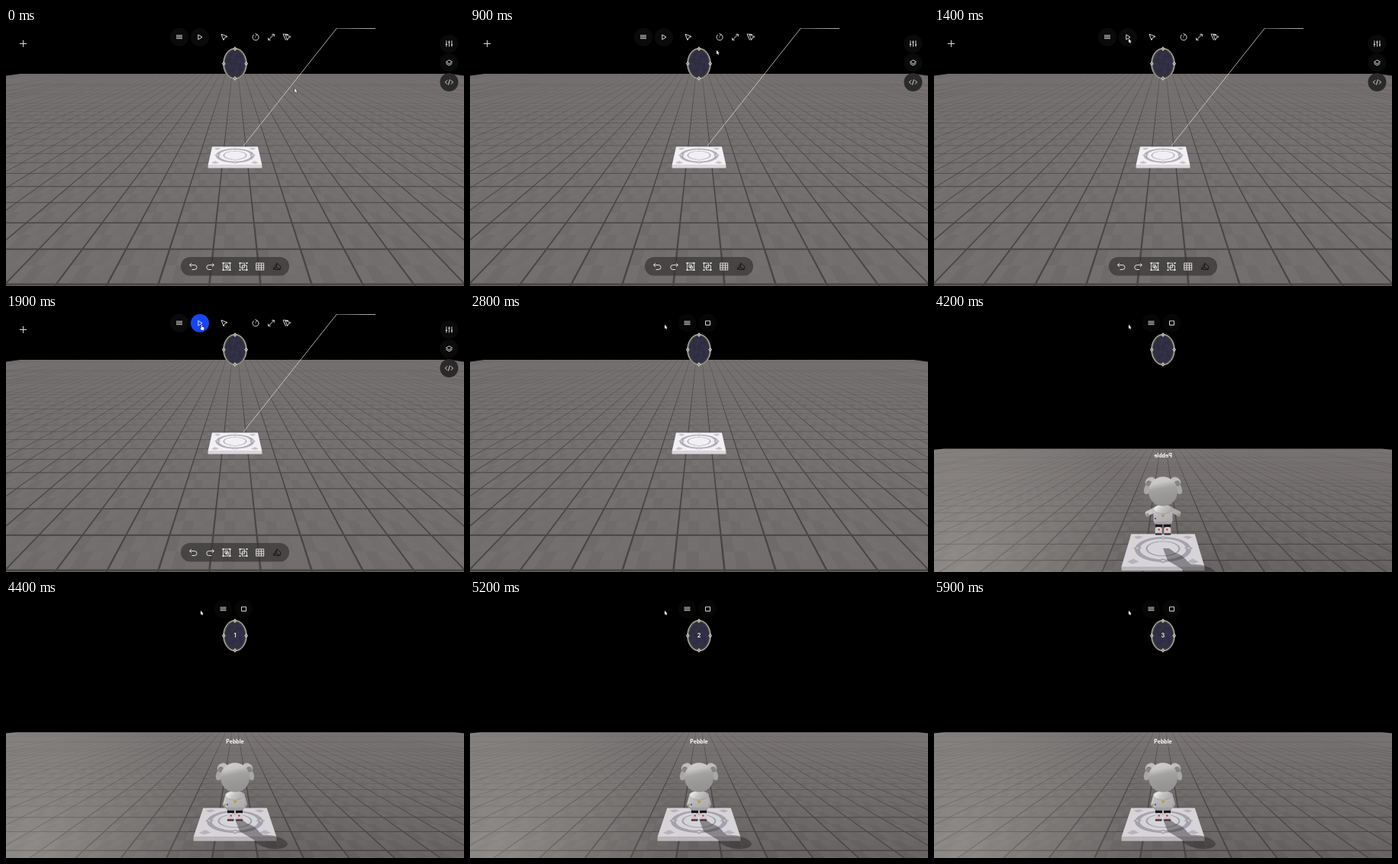
Write an HTML page with a canvas that moves like this. It is 600x338 px and loops after 6 s.

```html
<!DOCTYPE html>
<html lang="en">
<head>
<meta charset="utf-8">
<title>Scene editor</title>
<style>
  html, body { margin: 0; width: 100%; height: 100%; overflow: hidden; background: #000; }
  canvas { display: block; width: 100vw; height: 100vh; }
</style>
</head>
<body>
<canvas id="stage" width="600" height="338"></canvas>
<script>
const W = 600, H = 338, LOOP = 6000, FOCAL = 357, EDGE = 35.5, FAR = 36.5;
const canvas = document.getElementById('stage');
let ctx = canvas.getContext('2d');

const clamp = v => Math.max(0, Math.min(1, v));
const mix = (a, b, k) => a + (b - a) * k;

// Cameras: horizon in px, height in tiles, depth of the pad, cosine of the pitch.
const editorCam = { horizon: 23, height: 4.32, depth: 11.34, cos: .925, near: -8.5, glow: 0,
  floor: ['#757171', '#716d6c'], pad: '#f2f0f4', side: '#d9d7dc', mark: '#b1afb6' };
const playCam = height => ({ horizon: 147.5, height, depth: 7.79, cos: .998, near: -4.5, glow: .32,
  floor: ['#787473', '#666261'], pad: '#d6d4d9', side: '#b9b7bc', mark: '#a5a3aa' });

function project(cam, x, z, lift = 0) {
  const d = cam.depth + z * cam.cos;
  return [W / 2 + FOCAL * x / d, cam.horizon + FOCAL * (cam.height - lift) / (cam.cos * d)];
}

function gradient(x0, y0, x1, y1, ...colors) {
  const g = ctx.createLinearGradient(x0, y0, x1, y1);
  colors.forEach((c, i) => g.addColorStop(i / (colors.length - 1), c));
  return g;
}

function trace(points) {
  points.forEach(([x, y], i) => i ? ctx.lineTo(x, y) : ctx.moveTo(x, y));
  ctx.closePath();
}

function poly(points, color) {
  ctx.fillStyle = color;
  ctx.beginPath();
  trace(points);
  ctx.fill();
}

const quad = (cam, x0, z0, x1, z1, color, lift) =>
  poly([[x0, z0], [x1, z0], [x1, z1], [x0, z1]].map(([x, z]) => project(cam, x, z, lift)), color);

function ellipse(x, y, rx, ry, fill, stroke, width = 1, turn = 0) {
  ctx.beginPath();
  ctx.ellipse(x, y, rx, ry, turn, 0, 7);
  if (fill) { ctx.fillStyle = fill; ctx.fill(); }
  if (stroke) { ctx.strokeStyle = stroke; ctx.lineWidth = width; ctx.stroke(); }
}

function box(x, y, w, h, r, fill) {
  ctx.fillStyle = fill;
  ctx.beginPath();
  ctx.roundRect(x, y, w, h, r);
  ctx.fill();
}

function drawFloor(cam) {
  const top = project(cam, 0, FAR)[1];
  const ground = color => quad(cam, -EDGE, cam.near, EDGE, FAR, color);
  ground(gradient(0, top, 0, H, ...cam.floor));

  // Mottled texture, the same on every tile.
  for (let z = cam.near; z < 8; z++) {
    for (let x = -20.5; x < 20; x++) {
      for (let i = 0; i < 16; i++) {
        const tone = Math.abs(Math.sin(i * 91.7 + 3) * 437.5) % 1;
        if (tone > .3 && tone < .7) continue;
        const px = x + (i % 4) / 4, pz = z + (i >> 2) / 4;
        quad(cam, px, pz, px + .25, pz + .25, tone < .5 ? 'rgba(30,24,24,.035)' : 'rgba(255,245,245,.02)');
      }
    }
  }
  for (let x = -EDGE; x <= EDGE; x++) quad(cam, x - .02, cam.near, x + .02, FAR, '#484544');
  for (let z = cam.near; z <= FAR; z++) {
    const strength = mix(1, .4, clamp((z - 1) / 14));
    quad(cam, -EDGE, z - .025, EDGE, z + .025, `rgba(72,69,68,${strength})`);
  }
  // Light falling in from the lower left.
  const light = ctx.createRadialGradient(30, H, 0, 30, H, 250);
  light.addColorStop(0, `rgba(225,222,218,${cam.glow})`);
  light.addColorStop(1, 'rgba(225,222,218,0)');
  ground(light);
}

function drawPad(cam) {
  const s = 1.03, lift = .1;
  const at = (x, z) => project(cam, x, z, lift);
  const circle = r => Array.from({ length: 48 }, (_, i) =>
    at(r * Math.cos(i * Math.PI / 24), r * Math.sin(i * Math.PI / 24)));
  const ring = (outer, inner, color) => {
    ctx.fillStyle = color;
    ctx.beginPath();
    trace(circle(outer));
    trace(circle(inner));
    ctx.fill('evenodd');
  };
  const diamond = (x, z, r, color) => poly([at(x - r, z), at(x, z + r), at(x + r, z), at(x, z - r)], color);

  poly([at(-s, -s), at(s, -s), project(cam, s, -s), project(cam, -s, -s)], cam.side);
  quad(cam, -s, -s, s, s, cam.pad, lift);
  ring(.8, .66, cam.mark);
  ring(.49, .44, cam.mark);
  for (const [x, z] of [[1, 0], [-1, 0], [0, 1], [0, -1]]) {
    diamond(x * .73, z * .73, .13, cam.mark);
    diamond(x * .73, z * .73, .05, cam.pad);
  }
  for (const x of [-1, 1]) for (const z of [-1, 1]) {
    poly([[.62, .78], [.78, .9], [.92, .78], [.78, .62]].map(([a, b]) => at(x * a, z * b)), cam.mark + 'b0');
  }
}

const sceneCache = new Map();
function drawScene(cam) {
  const key = cam.horizon + ':' + cam.height;
  if (!sceneCache.has(key)) {
    const layer = document.createElement('canvas');
    layer.width = W;
    layer.height = H;
    const main = ctx;
    ctx = layer.getContext('2d');
    drawFloor(cam);
    drawPad(cam);
    ctx = main;
    sceneCache.set(key, layer);
  }
  ctx.drawImage(sceneCache.get(key), 0, 0);
}

function label(text, x, y, size, weight = 700) {
  ctx.font = `${weight} ${size}px Inter, "Open Sans", sans-serif`;
  ctx.textAlign = 'center';
  ctx.textBaseline = 'middle';
  ctx.fillStyle = '#fff';
  ctx.fillText(text, x, y);
}

function drawPortal(count) {
  ellipse(300, 46.7, 14.5, 19.4, '#302f43', '#5d5b53', 2.6);
  for (let i = 0; i < 22; i++) {
    const a = i * 2.4, r = Math.sqrt(i / 22);
    ellipse(300 + 11 * r * Math.cos(a), 46.7 + 15 * r * Math.sin(a), 1.6, 1.6, i % 2 ? '#3b3a5070' : '#26263670');
  }
  ellipse(300, 46.7, 15, 19.9, null, '#c3bfa9', 1);
  for (const [x, y] of [[300, 27.3], [300, 66], [285.3, 46.7], [314.7, 46.7]]) {
    poly([[x - 2.4, y], [x, y - 3], [x + 2.4, y], [x, y + 3]], '#cbc8ba');
    ellipse(x, y, .9, .9, '#77746a');
  }
  if (count) label(count, 300, 47, 7.5, 600);
}

const icons = {
  plus: 'M-4.5 0H4.5M0-4.5V4.5',
  menu: 'M-4-2H4M-4 0H4M-4 2H4',
  play: 'M-2.2-3.2L3 0L-2.2 3.2Z',
  stop: 'M-3-2.5H3V3H-3Z',
  pointer: 'M-4-4L4-.8L.6 .6L-.9 4Z',
  rotate: 'M-2.2-3.2A4 4 0 1 0 2-3.4M2-3.4L-.6-4.8M2-3.4L0-1.4M-.5 0H.5',
  scale: 'M-3.8 3.8L3.8-3.8M.8-3.8H3.8V-.8M-3.8 .8V3.8H-.8',
  multi: 'M-2-3.5L5-.5L2 .8L.5 4ZM-5-4L-1.5 4M-5-4L2-3.5',
  sliders: 'M-3.5-4V4M0-4V4M3.5-4V4M-4.7 1H-2.3M-1.2-2H1.2M2.3 1.5H4.7',
  layers: 'M0-3.5L4-1L0 1.4L-4-1ZM-4 1L0 3.5L4 1',
  code: 'M-2.5-2.6L-5 0L-2.5 2.6M2.5-2.6L5 0L2.5 2.6M1-3.5L-1 3.5',
  undo: 'M-2.5-4.5L-5-2L-2.5 .5M-5-2H1.5A3 3 0 0 1 1.5 4H-2',
  redo: 'M2.5-4.5L5-2L2.5 .5M5-2H-1.5A3 3 0 0 0-1.5 4H2',
  group: 'M-4.5-4.5H4.5V4.5H-4.5ZM-2.2-2.2H1V1H-2.2ZM-.5-.5H2.5V2.5H-.5Z',
  ungroup: 'M-4.5-4.5H1.5V1.5H-4.5ZM-1.5-1.5H4.5V4.5H-1.5Z',
  grid: 'M-5-4.5H5V4.5H-5ZM-1.7-4.5V4.5M1.7-4.5V4.5M-5-1.5H5M-5 1.5H5',
  snap: 'M-5 3.5L0-4.5L5 0L4 4ZM0-4.5L-1 1L-5 3.5M-1 1L4 4'
};

function icon(name, x, y, color = '#e4e4e4') {
  ctx.save();
  ctx.translate(x, y);
  ctx.strokeStyle = color;
  ctx.lineWidth = .95;
  ctx.stroke(new Path2D(icons[name]));
  ctx.restore();
}

function button(name, x, y, fill) {
  ellipse(x, y, 12, 12, fill);
  icon(name, x, y);
}

function drawEditor(hover) {
  ctx.strokeStyle = '#d8d8d0';
  ctx.lineWidth = .8;
  ctx.stroke(new Path2D('M311 154.5L433.5 0L484 .6'));
  icon('plus', 22.5, 20.5);
  button('menu', 227, 11.7, '#0a0a0a');
  ellipse(254, 12, 12, 12, '#0a0a0a');
  ellipse(254, 12, 12, 12, `rgba(22,70,240,${hover})`);
  icon('play', 254, 12);
  [['pointer', 286], ['rotate', 327], ['scale', 347.5], ['multi', 368]].forEach(([n, x]) => icon(n, x, 12));
  button('sliders', 580.5, 20.5, '#0a0a0a');
  button('layers', 580.5, 45.5, '#0a0a0a');
  button('code', 580.5, 71, '#2b2929');
  box(229, 300, 142, 24.5, 12, 'rgba(56,53,53,.72)');
  ['undo', 'redo', 'group', 'ungroup', 'grid'].forEach((n, i) => icon(n, 245.5 + i * 21.8, 312.5));
  for (const x of [289, 311]) for (const dx of [-4.5, 4.5]) for (const dy of [-4.5, 4.5])
    box(x + dx - 1, 312.5 + dy - 1, 2, 2, 0, '#e4e4e4');
  icon('snap', 355, 312.5, '#161616');
}

function drawShadow(drop) {
  ctx.save();
  ctx.translate(0, drop);
  ctx.fillStyle = 'rgba(30,28,30,.42)';
  ctx.beginPath();
  ctx.ellipse(347, 317, 22, 8.5, .15, 0, 7);
  ctx.ellipse(319, 301, 15, 6.5, .5, 0, 7);
  trace([[300, 287], [308, 287], [340, 310], [328, 316], [306, 303]]);
  ctx.fill();
  ctx.restore();
}

function drawCharacter(spread, sway) {
  for (const side of [-1, 1]) {
    const at = x => 300 + side * x;
    box(at(5.5) - 4.5, 273, 9, 7, 2, '#17161a');
    box(at(5.8) - 4.5, 279, 9, 10.5, 3, '#d2cfd0');
    box(at(5.8) - 4.5, 287.3, 9, 2.2, 1, '#2f2c2e');
    ellipse(at(5.3), 282.5, 1.3, 1.3, '#d2374a');
    box(at(5.8) - 3.5, 285.5, 7, 1, 0, '#d9a2a9');
    const handX = mix(12.5, 20, spread), handY = mix(267.5, 261.5, spread) + sway;
    ctx.lineCap = 'round';
    ctx.lineWidth = 6.5;
    ctx.strokeStyle = side < 0 ? '#c9c7c6' : '#adabac';
    ctx.beginPath();
    ctx.moveTo(at(9.5), 256);
    ctx.lineTo(at(handX), handY);
    ctx.stroke();
    ctx.lineCap = 'butt';
    ellipse(at(handX + .5), handY + 2, 2.2, 2.5, '#98969a');
  }
  box(287.5, 250 + sway, 25, 25.5, [10, 10, 5, 5], gradient(292, 250, 304, 276, '#d6d4d3', '#b7b5b8', '#acaaae'));
  box(288.5, 271.5, 23, 4, 2, '#a3a1a4');
  ellipse(300, 256 + sway, 12.5, 6, gradient(292, 251, 304, 262, '#eeecec', '#c5c3c4', '#b0aeb0'), '#989698', .6);
  poly([[297.8, 262], [300, 263.2], [302.2, 262], [301.2, 266], [298.8, 266]], '#b99a3a');
  ellipse(290, 268, 1, 1, '#48464a');

  for (const side of [-1, 1]) {
    const at = x => 300 + side * x;
    ellipse(at(20.5), 229, 4.2, 7.5, '#a9a7a5', '#8b898860', .5, side * -.3);
    ellipse(at(16.5), 219.5, 7, 5.7, '#bfbdbb', '#8f8d8c', .5, side * .5);
    ellipse(at(18.5), 222, 3.6, 3.8, '#858382');
  }
  ellipse(300, 232.5, 19, 19.3,
    gradient(295, 213, 303, 252, '#d0cecc', '#c8c6c4', '#a3a2a1', '#9b9a99', '#969594', '#929190'));
}

function drawName(mirrored) {
  ctx.save();
  ctx.translate(300, 186.3);
  if (mirrored) ctx.scale(-1, 1);
  label('Pebble', 0, 0, 7);
  ctx.restore();
}

const cursorPath = [[300, 378, 79], [500, 371, 68], [700, 351, 46], [900, 323, 29],
  [1000, 293, 20], [1100, 276, 17], [1250, 261, 15], [1400, 255, 14]];

function cursorAt(t) {
  const i = cursorPath.findIndex(p => p[0] > t);
  if (i === 0) return cursorPath[0].slice(1);
  if (i < 0) return cursorPath.at(-1).slice(1);
  const [t0, x0, y0] = cursorPath[i - 1], [t1, x1, y1] = cursorPath[i];
  const k = (t - t0) / (t1 - t0);
  return [mix(x0, x1, k), mix(y0, y1, k)];
}

function drawCursor(t) {
  const [x, y] = cursorAt(t);
  ctx.save();
  ctx.translate(x, y);
  const hand = t >= 1600 && t < 2100;
  const shape = new Path2D(hand
    ? 'M.7 0L1.8 0V2.7L4.5 3.4V5.5L3.8 7.3H1L-.8 4.6L.7 4.4Z'
    : 'M0 0L0 5.2L1.2 4.2L2.1 6L3 5.5L2.2 3.8L3.7 3.7Z');
  ctx.strokeStyle = '#000';
  ctx.lineWidth = .8;
  ctx.stroke(shape);
  ctx.fillStyle = '#fff';
  ctx.fill(shape);
  ctx.restore();
}

function draw(t) {
  ctx.globalAlpha = 1;
  ctx.fillStyle = '#000';
  ctx.fillRect(0, 0, W, H);
  if (t >= 4200) {
    const landing = clamp((t - 4200) / 200);
    const air = 1 - landing ** 2;
    drawScene(playCam(mix(3.18, 3.57, air)));
    drawShadow(20 * air);
    drawCharacter(1 - landing, .4 * Math.sin((t - 4400) / 1500 * Math.PI * 2));
    drawName(t < 4300);
  } else {
    drawScene(editorCam);
  }
  const count = t >= 5700 ? '3' : t >= 4700 ? '2' : t >= 4300 ? '1' : '';
  drawPortal(count);

  const editing = clamp((2200 - t) / 300);
  ctx.globalAlpha = editing;
  if (editing) drawEditor(clamp((t - 1500) / 300));
  ctx.globalAlpha = 1 - editing;
  if (editing < 1) {
    button('menu', 284.5, 11.7, '#060606');
    button('stop', 311.5, 11.5, '#060606');
  }
  ctx.globalAlpha = 1;
  drawCursor(t);
}

// The animation advances in steps of 100 ms.
const start = performance.now();
function tick() {
  draw(Math.floor((performance.now() - start) % LOOP / 100) * 100);
  requestAnimationFrame(tick);
}
tick();
</script>
</body>
</html>
```
